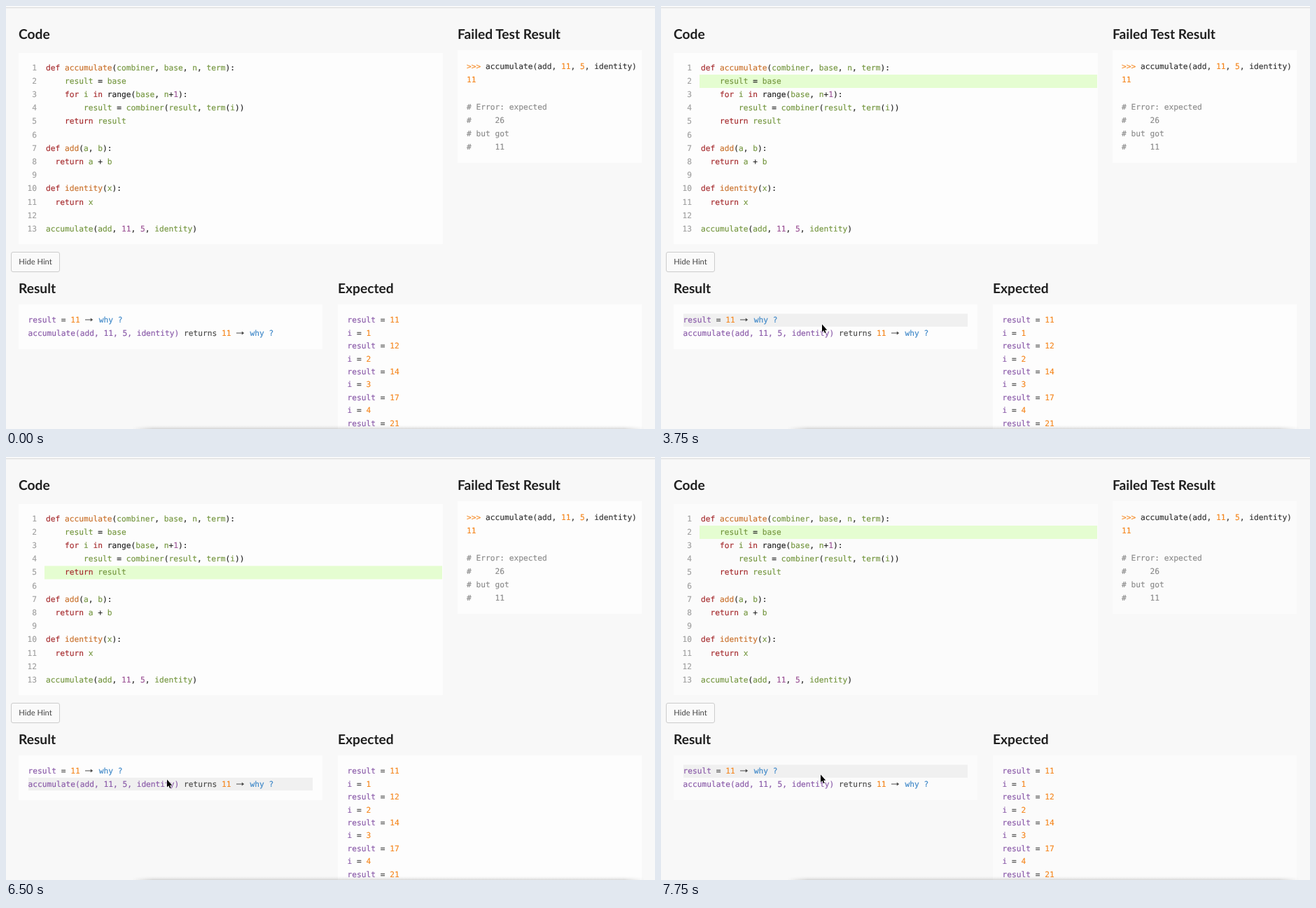
An HTML page with a canvas for the animation above (8000 ms loop, 927 by 604 pixels).

```html
<!DOCTYPE html>
<html lang="en">
<head>
<meta charset="utf-8">
<title>Code trace</title>
<style>
  html, body { margin: 0; width: 100%; height: 100%; overflow: hidden; background: #f8f8f8; }
  #stage { position: relative; width: 927px; height: 604px; overflow: hidden; text-rendering: geometricPrecision; }
  #stage > * { position: absolute; margin: 0; }
  canvas { left: 0; top: 0; }
  h3 { font: bold 19.2px/20px Lato, sans-serif; color: #1f1f1f; white-space: nowrap; }
  pre { font: 11.21px/19.22px "DejaVu Sans Mono", monospace; color: #222; -webkit-text-stroke: 0.15px; }
  .log { line-height: 18.42px; color: #4d4d4c; }
  .button {
    left: 7px; top: 351px; width: 70px; height: 29px; box-sizing: border-box;
    border: 1px solid #ccc; border-radius: 3px; background: #fafafa;
    font: 11.2px/27px Lato, sans-serif; color: #444; text-align: center; white-space: nowrap;
  }
  .kw { color: #a52a2d; }
  .fn { color: #c9702a; }
  .var { color: #74963f; }
  .num { color: #9c5496; }
  .id { color: #8959a8; }
  .val { color: #f5871f; }
  .link { color: #3f88c8; }
  .note { color: #8a8a8a; }
  .arrow { display: inline-block; width: 13.5px; height: 8px; }
  .arrow svg { display: block; }
</style>
</head>
<body>
<div id="stage">
  <canvas id="back" width="927" height="604"></canvas>

  <h3 style="left:18px;top:30.5px">Code</h3>
  <h3 style="left:645px;top:30.5px">Failed Test Result</h3>
  <h3 style="left:18px;top:394px">Result</h3>
  <h3 style="left:474px;top:394px">Expected</h3>

  <pre id="lines" style="right:883px;top:78.5px;text-align:right;color:#a0a0a0"></pre>
  <pre id="code" style="left:57px;top:78.5px">def accumulate(combiner, base, n, term):
    result = base
    for i in range(base, n+1):
        result = combiner(result, term(i))
    return result

def add(a, b):
  return a + b

def identity(x):
  return x

accumulate(add, 11, 5, identity)</pre>

  <pre style="left:658px;top:77px;color:#333"><span class="val">&gt;&gt;&gt;</span> accumulate(add, <span class="val">11</span>, <span class="val">5</span>, identity)
<span class="val">11</span>

<span class="note"># Error: expected
#     26
# but got
#     11</span></pre>

  <div class="button">Hide Hint</div>

  <pre class="log" style="left:31.5px;top:440.3px"><span class="id">result</span> = <span class="val">11</span> <span class="arrow"></span> <span class="link">why ?</span>
<span class="id">accumulate(add, 11, 5, identity)</span> returns <span class="val">11</span> <span class="arrow"></span> <span class="link">why ?</span></pre>
  <pre id="expected" class="log" style="left:487.5px;top:440.3px"></pre>

  <canvas id="front" width="927" height="604"></canvas>
</div>

<script>
const $ = id => document.getElementById(id);
const back = $("back").getContext("2d");
const front = $("front").getContext("2d");
const LOOP = 8000;

// Pointer stops: time, left, top
const stops = [
  [500, 492, 148], [750, 391, 246], [1750, 355, 303], [2000, 286, 385],
  [2250, 228, 411], [2500, 229, 424], [2750, 229, 441], [3000, 229, 453],
  [3750, 229, 454], [4000, 229, 462.5], [4250, 229, 462], [5250, 229, 470],
  [5500, 229, 473], [6500, 229, 460], [6750, 229, 453], [7750, 227, 453]
];

const panels = [[18, 67, 606, 273], [645, 63, 263, 161], [18, 426, 434, 64], [474, 426, 434, 178]];
const hoverTop = 439.5, rowHeight = 18.4;

function highlightCode() {
  const token = /(?<=def )\w+|[a-z]\w*|\d+/g;
  $("code").innerHTML = $("code").textContent.replace(token, (word, at, all) => {
    if (word === "range") return word;
    let kind = "var";
    if (/^(def|for|in|return)$/.test(word)) kind = "kw";
    else if (/^\d/.test(word)) kind = "num";
    else if (all.slice(0, at).endsWith("def ")) kind = "fn";
    return `<span class="${kind}">${word}</span>`;
  });
}

function fillLists() {
  $("lines").textContent = Array.from({ length: 13 }, (_, i) => i + 1).join("\n");
  const row = (name, value) => `<span class="id">${name}</span> = <span class="val">${value}</span>`;
  const rows = [row("result", 11)];
  for (let i = 1, sum = 11; i <= 4; i++) {
    sum += i;
    rows.push(row("i", i), row("result", sum));
  }
  $("expected").innerHTML = rows.join("\n");
  for (const el of document.querySelectorAll(".arrow")) {
    el.innerHTML = '<svg width="13" height="8"><path d="M1 3.4H8.8V1.6L12.2 4 8.8 6.4V4.6H1z" fill="#4d4d4c"/></svg>';
  }
}

function rect(color, x, y, w, h) {
  back.fillStyle = color;
  back.fillRect(x, y, w, h);
}

function drawBottomShadow() {
  for (let i = 0; i < 6; i++) {
    const fade = back.createLinearGradient(180, 0, 912, 0);
    const shade = `rgba(0,0,0,${0.13 * ((i + 1) / 6) ** 2})`;
    fade.addColorStop(0, "rgba(0,0,0,0)");
    fade.addColorStop(0.04, shade);
    fade.addColorStop(0.96, shade);
    fade.addColorStop(1, "rgba(0,0,0,0)");
    rect(fade, 180, 598 + i, 732, 1);
  }
}

function drawBack(t, stop) {
  rect("#f8f8f8", 0, 0, 927, 604);
  rect("#d9d9d9", 0, 2, 927, 1);
  for (const p of panels) rect(t < 7500 ? "#fdfdfd" : "#fbfbfb", ...p);
  if (t >= 3000) {
    const second = stop[2] + 1 > hoverTop + rowHeight;
    rect("#e5fdd1", 55, second ? 155.5 : 98, 568, 19);
    rect("#f0f0f0", 32, hoverTop + (second ? rowHeight : 0), 406, rowHeight);
  }
  drawBottomShadow();
}

function drawPointer(stop) {
  front.clearRect(0, 0, 927, 604);
  if (!stop) return;
  front.save();
  front.translate(stop[1], stop[2]);
  const shape = new Path2D("M1 .6V11.4L3.4 9.3 5 13.1 6.7 12.4 5.1 8.7H8.3z");
  front.lineWidth = 1.2;
  front.lineJoin = "round";
  front.strokeStyle = "#fff";
  front.stroke(shape);
  front.fillStyle = "#000";
  front.fill(shape);
  front.restore();
}

function draw() {
  const t = performance.now() % LOOP;
  const stop = stops.filter(s => s[0] <= t).pop();
  drawBack(t, stop);
  drawPointer(stop);
  requestAnimationFrame(draw);
}

highlightCode();
fillLists();
draw();
</script>
</body>
</html>
```
